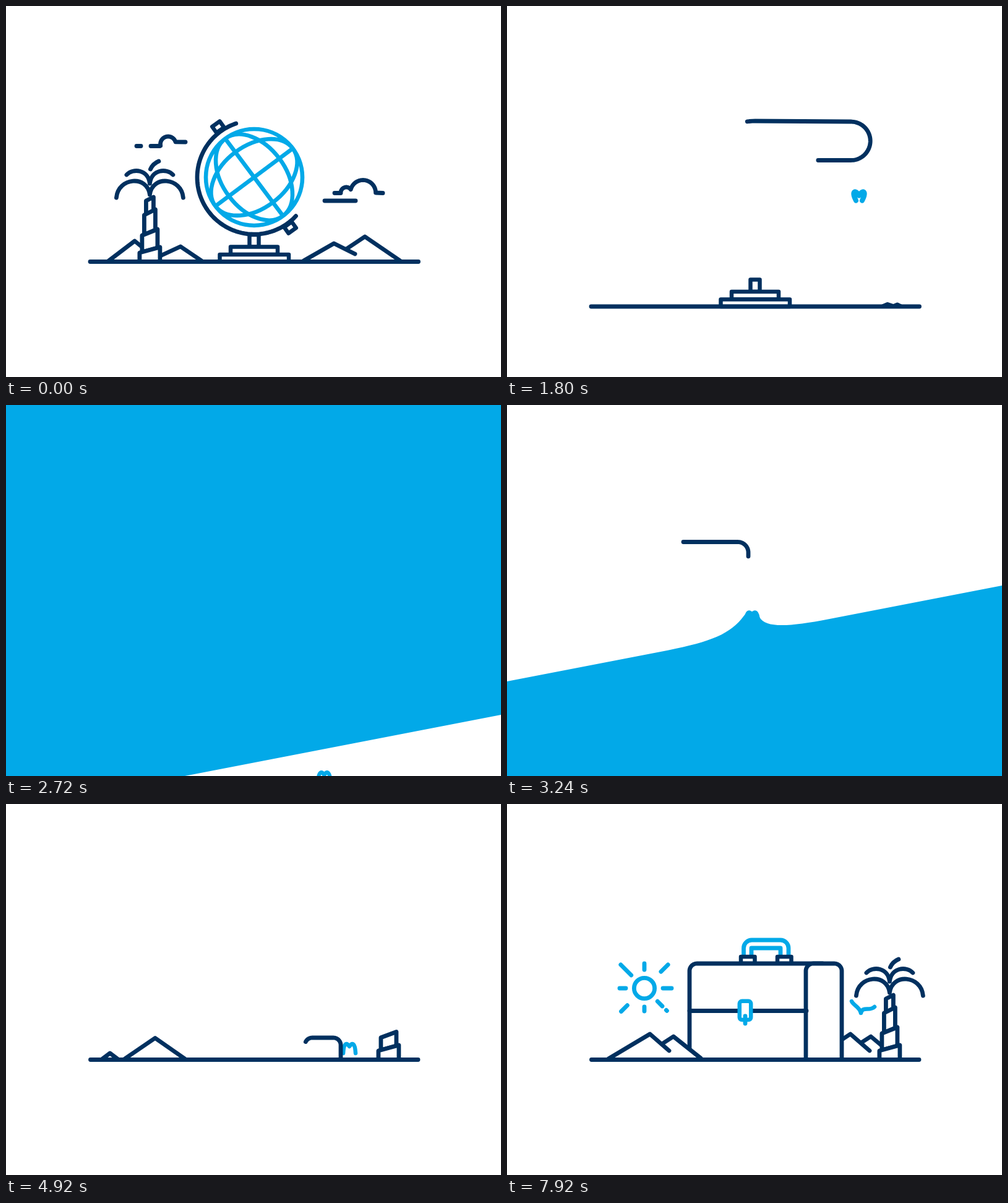
These frames come from a looping animation (800x600 px, 8 s). An HTML page with a canvas:

```html
<!DOCTYPE html>
<html lang="en">
<head>
<meta charset="utf-8">
<title>Travel</title>
<style>
html, body { margin: 0; width: 100%; height: 100%; overflow: hidden; background: #fff; }
canvas { display: block; width: 800px; height: 600px; }
</style>
</head>
<body>
<canvas id="stage" width="800" height="600"></canvas>
<script>
const ctx = document.getElementById('stage').getContext('2d');
const NAVY = '#00305f', BLUE = '#02a9e8', LOOP = 8000, GROUND = 413.5;
const RAD = Math.PI / 180;

const clamp = v => Math.max(0, Math.min(1, v));
const lerp = (a, b, k) => a + (b - a) * k;
const ramp = (t, a, b) => clamp((t - a) / (b - a));
const smooth = (t, a, b) => { const k = ramp(t, a, b); return k * k * (3 - 2 * k); };
const mix = (a, b, k) => a.map((v, i) => Array.isArray(v) ? mix(v, b[i], k) : lerp(v, b[i], k));

// Hermite interpolation through [time, value] pairs
function track(t, keys) {
  const n = keys.length - 1;
  if (t <= keys[0][0]) return keys[0][1];
  if (t >= keys[n][0]) return keys[n][1];
  let i = 0;
  while (t > keys[i + 1][0]) i++;
  const slope = j => {
    const a = keys[Math.max(0, j - 1)], b = keys[Math.min(n, j + 1)];
    return (b[1] - a[1]) / (b[0] - a[0]);
  };
  const [t0, a] = keys[i], [t1, b] = keys[i + 1];
  const h = t1 - t0, u = (t - t0) / h, u2 = u * u, u3 = u2 * u;
  return a * (2 * u3 - 3 * u2 + 1) + slope(i) * h * (u3 - 2 * u2 + u)
    + b * (3 * u2 - 2 * u3) + slope(i + 1) * h * (u3 - u2);
}

function stroke(color = NAVY, width = 6.8) {
  ctx.strokeStyle = color;
  ctx.lineWidth = width;
  ctx.stroke();
}

function trace(points) {
  ctx.beginPath();
  points.forEach(([x, y]) => ctx.lineTo(x, y));
}

function line(points, color, width) {
  trace(points);
  stroke(color, width);
}

function fillWhite() {
  ctx.fillStyle = '#fff';
  ctx.fill();
}

function box(x0, y0, x1, y1, r = 0, color = NAVY) {
  ctx.beginPath();
  ctx.roundRect(x0, y0, x1 - x0, y1 - y0, r);
  fillWhite();
  stroke(color, 6.5);
}

// A route of lines and arcs of which any stretch can be drawn
class Route {
  constructor(x, y) { this.pts = [[x, y]]; this.at = [0]; }
  get length() { return this.at[this.at.length - 1]; }
  to(x, y) {
    const [px, py] = this.pts[this.pts.length - 1];
    this.at.push(this.length + Math.hypot(x - px, y - py));
    this.pts.push([x, y]);
    return this;
  }
  arc(cx, cy, r, a0, a1) {
    const n = Math.ceil(Math.abs(a1 - a0) / 3);
    for (let i = 0; i <= n; i++) {
      const a = lerp(a0, a1, i / n) * RAD;
      this.to(cx + r * Math.cos(a), cy + r * Math.sin(a));
    }
    return this;
  }
  point(s) {
    let i = 0;
    while (i < this.at.length - 2 && this.at[i + 1] < s) i++;
    const k = (s - this.at[i]) / (this.at[i + 1] - this.at[i] || 1);
    return mix(this.pts[i], this.pts[i + 1], clamp(k));
  }
  draw(s0, s1, color) {
    if (s1 - s0 < 0.5) return;
    const mid = this.pts.filter((p, i) => this.at[i] > s0 && this.at[i] < s1);
    line([this.point(s0), ...mid, this.point(s1)], color);
  }
}

const armStart = 42.8;
const unwind = new Route(401 + 92 * Math.cos(armStart * RAD), 278 + 92 * Math.sin(armStart * RAD))
  .arc(401, 278, 92, armStart, 270).to(556, 187)
  .arc(556, 218.3, 31.2, -90, 90).to(241, 249.5)
  .arc(241, 270, 20.5, 270, 90).to(560, 290.5);
const landing = new Route(0, 221.5).to(373, 221.5)
  .arc(373, 238.5, 17, -90, 0).to(390, 466)
  .arc(337, 466, 53, 0, 90).to(140, 519)
  .arc(140, 466.2, 52.8, 90, 270).to(667, GROUND);
const clouds = [
  new Route(211, 226.5).to(218, 226.5),
  new Route(234, 226.5).to(249, 226.5).arc(262, 223.5, 12.5, 168, 343).to(290, 220),
  new Route(531, 302.5).to(541, 302.5).arc(550, 302, 9, 180, 318)
    .arc(577, 302, 20.5, 195, 360).to(609, 302.5),
  new Route(515, 315).to(565, 315)
];

// half width, then bottom and top heights of the left and right side
const TRUNK = [
  [16.5, 413, 399, 413, 390], [12.5, 398, 371, 391, 361],
  [9, 370, 338, 362, 329], [6, 337, 315, 331, 309]
];

function palm(x, grow, leaf) {
  ctx.save();
  ctx.translate(x, 0);
  for (let i = 3; i >= 0; i--) {
    const k = clamp(grow - i);
    if (!k) continue;
    const [w, bl, tl, br, tr] = TRUNK[i];
    trace([[-w, bl], [-w, lerp(bl, tl, k)], [w, lerp(br, tr, k)], [w, br]]);
    if (i) ctx.closePath();
    fillWhite();
    stroke();
  }
  if (leaf > 0.02) {
    ctx.translate(0, 305);
    ctx.scale(leaf, leaf);
    ctx.beginPath();
    for (const d of [-1, 1]) {
      ctx.moveTo(54 * d, 5);
      ctx.bezierCurveTo(51 * d, -28, 4 * d, -32, 0, 0);
      ctx.moveTo(37.5 * d, -32);
      ctx.bezierCurveTo(27 * d, -43, 3 * d, -41, 0, -18);
    }
    ctx.moveTo(1, -41);
    ctx.quadraticCurveTo(5, -50, 14.5, -54);
    stroke(NAVY, 6.8 / leaf);
  }
  ctx.restore();
}

function hill(points, filled) {
  if (filled) {
    trace([...points, [points[2][0], 413], [points[0][0], 413]]);
    fillWhite();
  }
  line(points);
}

const flatHill = x => [[x - 2, 413], [x, 412], [x + 2, 413]];

function globe(t) {
  if (t > 1740) return;
  const k = smooth(t, 1050, 1740);
  const size = lerp(1, 0.1, k);
  const turn = track(t, [[0, 0], [840, 16], [1400, 60], [1800, 150]]) * RAD;
  ctx.save();
  ctx.translate(lerp(401, 569, k), lerp(277, 308, k) - 85 * Math.sin(Math.PI * k));
  ctx.rotate(turn);
  const r = 78 * size, spin = t / 520;
  ctx.beginPath();
  ctx.arc(0, 0, r, 0, 7);
  ctx.save();
  ctx.rotate(53.2 * RAD);
  for (const shift of [0, 0.71]) {
    const b = Math.abs(Math.sin(spin + shift)) * r;
    ctx.moveTo(r, 0);
    ctx.ellipse(0, 0, r, b, 0, 0, 7);
  }
  ctx.moveTo(0, -r);
  ctx.lineTo(0, r);
  ctx.moveTo(0.65 * r, 0);
  ctx.ellipse(0, 0, 0.65 * r, r, 0, 0, 7);
  ctx.restore();
  stroke(BLUE, lerp(6.6, 5, k));
  ctx.rotate(54.4 * RAD);
  const knob = size * (1 - ramp(t, 1150, 1450));
  if (knob > 0.05) for (const d of [-1, 1]) {
    ctx.save();
    ctx.scale(d * knob, knob);
    box(94, -7.5, 106, 7.5);
    ctx.restore();
  }
  ctx.restore();
}

// Each wing is a tip and two handles, relative to the body
const mirror = wing => [wing, wing.map(([x, y]) => [-x, y])];
const POSES = {
  hug: mirror([[-5, 8], [-13, -7], [-6, -11]]),
  fold: mirror([[-10, 11], [-9, -7], [-4, -6]]),
  bank: [[[-9, 6], [-11, -9], [-3, -9]], [[4, 10], [13, -2], [6, -6]]],
  glide: [[[-15, -19], [-12, -12], [-2, -10]], [[22, -10], [14, -2], [3, -12]]]
};
const FLIGHT = [
  [1740, 569, 306, 'hug'], [1840, 569, 307, 'hug'], [2320, 565, 531, 'fold'],
  [2600, 565, 710, 'fold'], [3000, 396, 338, 'fold'], [3320, 396, 340, 'fold'],
  [4240, 545, 393, 'fold'], [4920, 555, 392, 'fold'], [5900, 555, 381, 'fold'],
  [6440, 573, 334, 'bank'], [6720, 572, 338, 'glide']
];

function bird(t) {
  if (t < FLIGHT[0][0]) return;
  let i = 0;
  while (i < FLIGHT.length - 2 && t > FLIGHT[i + 1][0]) i++;
  const [t0, x0, y0, from] = FLIGHT[i], [t1, x1, y1, to] = FLIGHT[i + 1];
  const raw = ramp(t, t0, t1);
  const k = t0 === 1840 ? raw * raw : raw;
  ctx.save();
  ctx.translate(lerp(x0, x1, k), lerp(y0, y1, k));
  ctx.beginPath();
  for (const [tip, c1, c2] of mix(POSES[from], POSES[to], k)) {
    ctx.moveTo(...tip);
    ctx.bezierCurveTo(...c1, ...c2, 0, 0);
  }
  stroke(BLUE, lerp(8, 6.5, ramp(t, 1800, 2320)));
  ctx.restore();
}

function firstScene(t) {
  if (t > 2300) return;
  const out = smooth(t, 750, 1500);
  ctx.save();
  ctx.translate(0, 72.5 * Math.pow(t / 1800, 6.6));
  if (out < 1) {
    hill(mix([[166, 412], [208, 380], [243, 409]], flatHill(210), out));
    hill(mix([[241, 408], [282, 389], [316, 412]], flatHill(290), out));
    palm(232.4, 4 * (1 - smooth(t, 850, 1600)), 1 - smooth(t, 600, 1050));
  }
  if (t < 1920) {
    const shrink = smooth(t, 750, 1800);
    hill(mix([[481, 412], [530, 384], [564, 401]], [[608, 413], [615, 410], [624, 413]], shrink));
    hill(mix([[550, 393], [580, 373], [637, 412]], [[625, 413], [631, 410.5], [636, 413]], shrink));
  }
  box(393.5, 370, 408.5, 389.5);
  box(363, 389.5, 439, 402);
  box(345.5, 402, 457, GROUND);
  line([[136, GROUND], [666.5, GROUND]]);
  ctx.restore();

  const gone = smooth(t, 350, 1250);
  clouds.forEach((c, i) => {
    ctx.save();
    ctx.translate((i < 2 ? 1 : -1) * 14 * t / 1250, 0);
    c.draw(c.length * gone, c.length);
    ctx.restore();
  });
  globe(t);
}

function ribbon(t) {
  if (t < 2700) {
    const drop = Math.max(0, (t - 1800) / 520);
    const tail = track(t, [[0, 0], [840, 26], [1400, 125], [1800, 352], [2320, 870], [2700, 1080]]);
    const head = track(t, [[0, 335], [840, 361], [1400, 460], [1800, 671], [2320, 1046], [2700, 1240]]);
    ctx.save();
    ctx.translate(0, 205.5 * drop * drop - 0.8 * (1 - ramp(t, 900, 1800)));
    unwind.draw(tail, head);
    ctx.restore();
  } else if (t < 4720) {
    const tail = track(t, [[2900, 0], [3240, 285], [3360, 399], [4240, 790], [4720, 1078]]);
    const head = track(t, [[2850, 0], [3240, 406], [3360, 510], [4240, 895], [4720, landing.length]]);
    landing.draw(tail, Math.min(head, landing.length));
  }
}

function wave(t) {
  if (t < 2080 || t > 3560) return;
  const front = 216 + 1.1 * (t - 2320);
  const back = 447 + 1.1 * (t - 3240);
  ctx.fillStyle = BLUE;
  ctx.beginPath();
  if (t < 2830) {
    ctx.moveTo(0, -10);
    ctx.lineTo(0, front);
    ctx.lineTo(800, front - 155);
    ctx.lineTo(800, -10);
  } else {
    const edge = x => back - 155 * x / 800;
    const pull = clamp((edge(395) - 334) / 36.5) * (1 - smooth(t, 3280, 3440));
    // lift is the distance above the resting edge
    const p = (x, lift) => [x, edge(x) - lift * pull];
    ctx.moveTo(0, 610);
    ctx.lineTo(...p(0, 0));
    ctx.lineTo(...p(260, 0));
    ctx.bezierCurveTo(...p(330, 0), ...p(362, 7), ...p(383, 32));
    ctx.quadraticCurveTo(...p(388, 37.5), ...p(396, 36.5));
    ctx.quadraticCurveTo(...p(404, 35), ...p(408, 25));
    ctx.bezierCurveTo(...p(418, 5), ...p(455, 0), ...p(520, 0));
    ctx.lineTo(...p(800, 0));
    ctx.lineTo(800, 610);
  }
  ctx.fill();
}

function handle(t) {
  const lift = smooth(t, 5580, 5960);
  if (!lift) return;
  ctx.save();
  ctx.beginPath();
  ctx.rect(360, 200, 120, 57);
  ctx.clip();
  ctx.translate(0, 42 * (1 - lift));
  ctx.beginPath();
  ctx.moveTo(382.5, 245);
  ctx.arcTo(382.5, 220, 400, 220, 13);
  ctx.arcTo(455, 220, 455, 245, 13);
  ctx.lineTo(455, 245);
  stroke(BLUE);
  line([[395, 245], [395, 233], [442, 233], [442, 245]], BLUE);
  box(378, 247, 400.5, 258);
  box(437, 247, 459.5, 258);
  ctx.restore();
}

function suitcase(t) {
  if (t < 4780) return;
  const top = track(t, [[4780, 411], [4920, 378], [5040, 348], [5400, 258]]);
  const r = Math.min(12, 411 - top);
  const wide = smooth(t, 5250, 5650);
  const left = lerp(483, 295, wide);

  handle(t);
  if (wide > 0) {
    const front = new Route(left, GROUND).to(left, top + r)
      .arc(left + r, top + r, r, 180, 270).to(510, top);
    trace([...front.pts, [510, GROUND]]);
    fillWhite();
    line(front.pts);
  }
  const side = new Route(541, 413).to(541, top + r)
    .arc(529, top + r, r, 0, -90).to(495, top)
    .arc(495, top + r, r, 270, 180).to(483, 413);
  if (t > 5000) {
    trace(side.pts);
    fillWhite();
  }
  const reach = t < 4920 ? 89 * ramp(t, 4780, 4920) : lerp(89, side.length, ramp(t, 4920, 5120));
  side.draw(0, reach);

  const strap = smooth(t, 5450, 5750);
  if (strap > 0) line([[484, 334.5], [lerp(484, 295, strap), 334.5]]);
  const clasp = smooth(t, 5620, 5880);
  if (clasp > 0.05) {
    ctx.save();
    ctx.translate(385, 334);
    ctx.scale(clasp, clasp);
    box(-9.2, -15.2, 9.2, 15, 4, BLUE);
    line([[0, 9], [0, 21]], BLUE);
    ctx.restore();
  }
}

// inner and outer reach of each ray while rising and at rest, every 45 degrees
const RAYS = [
  [30, 34, 30, 44], [28, 31, 30, 41], [40, 44, 30, 37], [29, 32, 39, 53],
  [31, 38, 30, 40], [36, 40, 30, 54], [38, 44, 30, 40], [31, 35, 38, 54]
];

function sun(t) {
  const size = smooth(t, 5900, 6240);
  if (size < 0.03) return;
  const rest = smooth(t, 6440, 7300);
  const turn = track(t, [[5900, 70], [6440, 18.5], [7000, 3], [7400, 0]]);
  ctx.save();
  ctx.translate(lerp(222.6, 222, rest), track(t, [[5900, 350], [6440, 313], [6900, 299], [7300, 298]]));
  ctx.scale(size, size);
  ctx.beginPath();
  ctx.arc(0, 0, 16.6, 0, 7);
  stroke(BLUE);
  RAYS.forEach(([a, b, c, d], i) => {
    const ang = (i * 45 + turn) * RAD, x = Math.cos(ang), y = Math.sin(ang);
    const ray = (r0, r1) => line([[x * r0, y * r0], [x * r1, y * r1]], BLUE);
    ray(lerp(a, c, rest), lerp(b, d, rest));
    if (i === 1 && rest > 0.8) ray(50, 51.5);
  });
  ctx.restore();
}

function secondScene(t) {
  if (t < 4640) return;
  const right = smooth(t, 5080, 5700);
  if (right > 0) {
    hill(mix(flatHill(590), [[574, 385], [588, 376], [631, 412]], right));
    hill(mix(flatHill(555), [[505, 405], [555, 372], [586, 399]], right));
  }
  bird(t);
  suitcase(t);
  palm(618.4, track(t, [[4700, 0], [4920, 1.75], [5400, 4]]), smooth(t, 5300, 5900));

  const seedBig = smooth(t, 4680, 4920), seedSmall = smooth(t, 4840, 4920);
  const settle = smooth(t, 4920, 5700);
  if (seedBig > 0) {
    const start = mix(flatHill(240), [[192, 412], [241, 378.5], [289, 412]], seedBig);
    hill(mix(start, [[252, 387], [269, 376], [313, 411]], settle), true);
  }
  if (seedSmall > 0) {
    const start = mix(flatHill(168), [[156, 412], [168, 403], [180, 412]], seedSmall);
    hill(mix(start, [[164, 412], [231, 372], [262, 399]], settle));
  }
  if (t >= 4720) line([[136.5, GROUND], [666, GROUND]]);
  sun(t);
}

function frame(now) {
  const t = Math.floor((now % LOOP) / 40) * 40;
  ctx.fillStyle = '#fff';
  ctx.fillRect(0, 0, 800, 600);
  ctx.lineCap = ctx.lineJoin = 'round';
  firstScene(t);
  ribbon(t);
  if (t < 4640) bird(t);
  wave(t);
  secondScene(t);
  requestAnimationFrame(frame);
}
requestAnimationFrame(frame);
</script>
</body>
</html>
```
